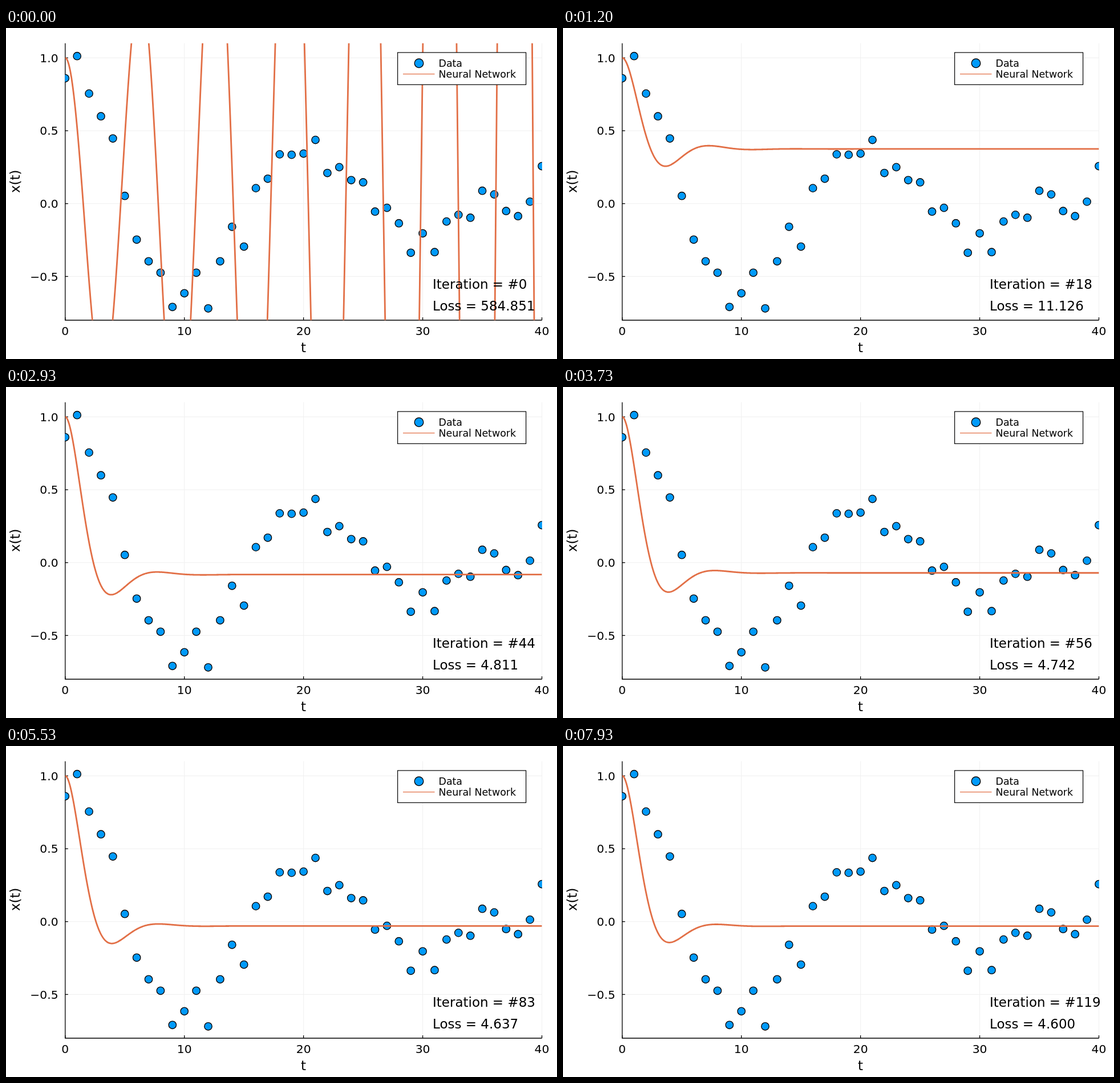
An HTML page with a canvas that plays this animation: 966 by 580 pixels, repeating every 8 s.

```html
<!DOCTYPE html>
<html lang="en">
<head>
<meta charset="utf-8">
<title>Fitting a damped oscillation</title>
<style>
  html, body { margin: 0; width: 100%; height: 100%; overflow: hidden; background: #fff; }
  canvas { display: block; }
</style>
</head>
<body>
<canvas id="stage" width="966" height="580"></canvas>
<script>
const ctx = document.getElementById('stage').getContext('2d');
const LOOP = 8000, STEPS = 120;
const LEFT = 103.8, RIGHT = 939.5, T_MAX = 40;
const ZERO = 307.7, UNIT = 255.4;
const BLUE = '#009afa', ORANGE = '#e26f46', BLACK = '#000', GRID = '#f0f0f0';

const px = t => LEFT + t * (RIGHT - LEFT) / T_MAX;
const py = x => ZERO - x * UNIT;
const TOP = py(1.1), BOTTOM = py(-0.8);

// The noisy measurements of x at t = 0, 1, ..., 40
const data = [
  0.86, 1.012, 0.755, 0.599, 0.447, 0.053, -0.247, -0.396, -0.474, -0.709, -0.615,
  -0.474, -0.719, -0.396, -0.159, -0.295, 0.106, 0.171, 0.338, 0.335, 0.343,
  0.437, 0.21, 0.25, 0.161, 0.146, -0.055, -0.029, -0.135, -0.337, -0.204,
  -0.333, -0.123, -0.077, -0.097, 0.088, 0.063, -0.051, -0.086, 0.013, 0.257
];

// Oscillator released at rest from x = 1; training settles its parameters
function model(step) {
  const decay = 0.523 + 0.00032 * step - 0.5847 * Math.exp(-step / 8.5);
  const stiffness = 0.947 + 0.053 * Math.exp(-step / 12);
  const offset = -0.031 + 0.531 * Math.exp(-((step / 34.8) ** 2)) * Math.sin(0.0584 + 0.08135 * step);
  const w = Math.sqrt(stiffness - decay ** 2);
  return t => offset + (1 - offset) * Math.exp(-decay * t)
    * (Math.cos(w * t) + decay / w * Math.sin(w * t));
}

function squaredError(x) {
  return data.reduce((sum, d, t) => sum + (x(t) - d) ** 2, 0);
}

function stroke(points, color, width) {
  ctx.beginPath();
  points.forEach(([x, y]) => ctx.lineTo(x, y));
  ctx.strokeStyle = color;
  ctx.lineWidth = width;
  ctx.stroke();
}

function marker(x, y, radius) {
  ctx.beginPath();
  ctx.arc(x, y, radius, 0, 2 * Math.PI);
  ctx.fillStyle = BLUE;
  ctx.fill();
  ctx.strokeStyle = BLACK;
  ctx.lineWidth = 1.35;
  ctx.stroke();
}

function label(text, x, y, size, align = 'left') {
  ctx.font = `${size}px "DejaVu Sans", sans-serif`;
  ctx.textAlign = align;
  ctx.fillStyle = BLACK;
  ctx.fillText(text, x, y);
}

function drawAxes() {
  for (let t = 0; t <= T_MAX; t += 10) {
    stroke([[px(t), TOP], [px(t), BOTTOM]], GRID, 1);
    stroke([[px(t), BOTTOM], [px(t), BOTTOM - 5]], BLACK, 1.3);
    label(t, px(t), 538, 20.3, 'center');
  }
  for (let x = -0.5; x <= 1; x += 0.5) {
    stroke([[LEFT, py(x)], [RIGHT, py(x)]], GRID, 1);
    stroke([[LEFT, py(x)], [LEFT + 5, py(x)]], BLACK, 1.3);
    label(x.toFixed(1).replace('-', '\u2212'), 91.6, py(x) + 7.3, 20.3, 'right');
  }
  stroke([[LEFT, TOP], [LEFT, BOTTOM], [RIGHT, BOTTOM]], BLACK, 1.3);
  label('t', 521.5, 568.2, 23, 'center');
  ctx.save();
  ctx.translate(24.4, 268.8);
  ctx.rotate(-Math.PI / 2);
  label('x(t)', 0, 0, 23, 'center');
  ctx.restore();
}

function drawPlot(x) {
  const curve = [];
  for (let i = 0; i <= 1000; i++) {
    const t = i * T_MAX / 1000;
    curve.push([px(t), py(x(t))]);
  }
  ctx.save();
  ctx.beginPath();
  ctx.rect(LEFT - 0.5, TOP, RIGHT - LEFT + 0.8, BOTTOM - TOP);
  ctx.clip();
  data.forEach((d, t) => marker(px(t), py(d), 6.7));
  ctx.lineJoin = 'round';
  stroke(curve, ORANGE, 2.8);
  ctx.restore();
}

function drawLegend() {
  ctx.fillStyle = '#fff';
  ctx.fillRect(686.6, 43, 225, 56.3);
  ctx.strokeStyle = BLACK;
  ctx.lineWidth = 1.2;
  ctx.strokeRect(686.6, 43, 225, 56.3);
  marker(724, 61.8, 7.8);
  stroke([[696, 80.6], [751.5, 80.6]], ORANGE, 1.4);
  label('Data', 758.5, 68.2, 17.4);
  label('Neural Network', 758.5, 86.9, 17.4);
}

function draw(now) {
  // The small lead absorbs rounded clock times
  const step = Math.min(STEPS - 1, Math.floor((now % LOOP + 4) * STEPS / LOOP));
  const x = model(step);
  ctx.fillStyle = '#fff';
  ctx.fillRect(0, 0, 966, 580);
  drawAxes();
  drawPlot(x);
  drawLegend();
  label(`Iteration = #${step}`, 748, 456.6, 23);
  label(`Loss = ${squaredError(x).toFixed(3)}`, 748, 494.8, 23);
}

const start = performance.now();
function tick() {
  draw(performance.now() - start);
  requestAnimationFrame(tick);
}
tick();
</script>
</body>
</html>
```
